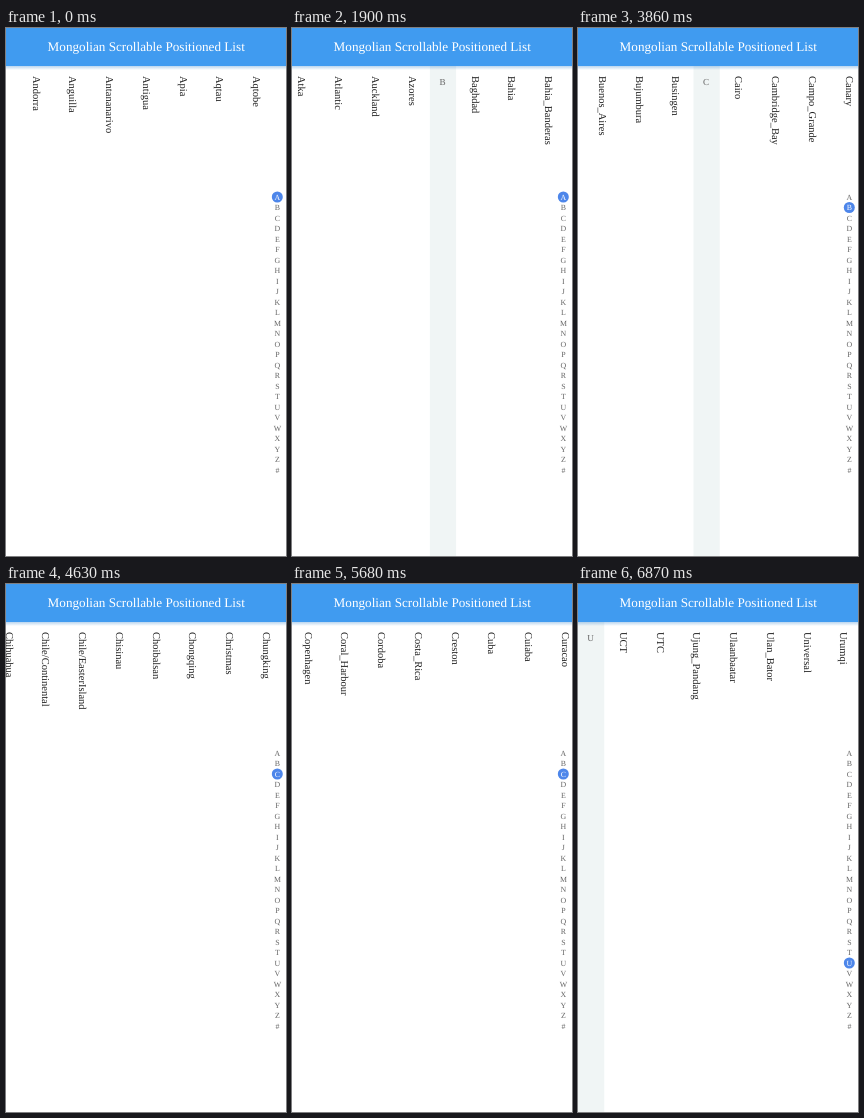
An HTML page with a canvas that plays this animation: 280x528 px, repeating every 8 s.

```html
<!DOCTYPE html>
<html lang="en">
<head>
<meta charset="utf-8">
<title>Mongolian Scrollable Positioned List</title>
<style>
html, body { margin: 0; width: 100%; height: 100%; overflow: hidden; background: #fff; }
canvas { display: block; width: 280px; height: 528px; }
</style>
</head>
<body>
<canvas id="stage"></canvas>
<script>
const W = 280, H = 528, LOOP = 8000, STEP = 70;
const ITEM = 36.75, HEADER = 26.25, START = 11.1, BAR = 38;
const SERIF = '"Liberation Serif", "Times New Roman", serif';
const LETTERS = 'ABCDEFGHIJKLMNOPQRSTUVWXYZ#';

const sections = `
Andorra Anguilla Antananarivo Antigua Apia Aqtau Aqtobe Araguaina Arizona Aruba Ashgabat Ashkhabad Asmara Asmera Asuncion Athens Atikokan Atka Atlantic Auckland Azores
Baghdad Bahia Bahia_Banderas Bahrain Baku Bamako Bangkok Bangui Banjul Barbados Beirut Belem Belfast Belgrade Belize Berlin Bermuda Beulah Bishkek Blanc-Sablon Blantyre Boa_Vista Bogota Boise Bratislava Brazzaville Brisbane Broken_Hill Brunei Brussels Bucharest Budapest Buenos_Aires Bujumbura Busingen
Cairo Cambridge_Bay Campo_Grande Canary Canberra Cancun Cape_Verde Caracas Casablanca Casey Catamarca Cayenne Cayman Central Ceuta Chagos Chatham Chicago Chihuahua Chile/Continental Chile/EasterIsland Chisinau Choibalsan Chongqing Christmas Chungking Cocos Colombo Comoro Conakry Copenhagen Coral_Harbour Cordoba Costa_Rica Creston Cuba Cuiaba Curacao Currie
Dacca Dakar Damascus Danmarkshavn Dar_es_Salaam Darwin Davis
EET EST EST5EDT East-Indiana Easter Eastern Edmonton
Fakaofo Faroe Fiji Fortaleza Freetown Funafuti
GB GB-Eire GMT Gaborone Galapagos Gambier Gaza
HST Halifax Harare Harbin Havana Hawaii Hebron
Indianapolis Inuvik Iqaluit Iran Irkutsk Isle_of_Man Israel
Jakarta Jamaica Japan Jayapura Jersey Jerusalem
Kabul Kaliningrad Kamchatka Kampala Karachi Kashgar Kathmandu
La_Paz Lagos Libreville Lima Lindeman Lisbon Ljubljana
MET MST MST7MDT Macao Macau Maceio Macquarie
NZ NZ-CHAT Nairobi Nassau Nauru Navajo Ndjamena
Ojinaga Omsk Oral Oslo Ouagadougou
PRC PST8PDT Pacific Pago_Pago Palau Palmer Panama
Qatar Qyzylorda
ROC ROK Rainy_River Rangoon Rankin_Inlet Recife Regina
Saigon Saipan Sakhalin Samara Samarkand Samoa San_Juan
Tahiti Taipei Tallinn Tarawa Tashkent Tbilisi Tehran
UCT UTC Ujung_Pandang Ulaanbaatar Ulan_Bator Universal Urumqi
Vaduz Vancouver Vatican Vevay Vienna Vientiane Vilnius`
  .trim().split('\n').map(line => line.split(' '));

// Lay the whole list out from left to right.
const rows = [], sectionLeft = [];
let edge = START;
sections.forEach((names, i) => {
  sectionLeft.push(i ? edge : 0);
  if (i) {
    rows.push({ x: edge, width: HEADER, letter: LETTERS[i] });
    edge += HEADER;
  }
  for (const name of names) {
    rows.push({ x: edge, width: ITEM, name });
    edge += ITEM;
  }
});

// Swipes: start time, number of steps, resting offset, deceleration.
const swipes = [
  [500, 9, 228.8, 1.5],
  [1340, 9, 645, 1.5],
  [2110, 9, 1040, 1.5],
  [2880, 8, 1489, 1.5],
  [3510, 8, 2050, 1.5],
  [4210, 12, 2956.4, 2],
  [5050, 12, 3234.9, 2]
];

// Letters touched while dragging along the index bar.
const DRAG_START = 5890, DRAG_PATH = 'CDEGIKMOQRSTUVU';

function offsetAt(t) {
  if (t >= DRAG_START) {
    const i = Math.min(DRAG_PATH.length - 1, Math.floor((t - DRAG_START) / STEP));
    return sectionLeft[LETTERS.indexOf(DRAG_PATH[i])];
  }
  let offset = 0;
  for (const [start, steps, end, power] of swipes) {
    if (t < start) break;
    const p = Math.min(1, (Math.floor((t - start) / STEP) + 1) / steps);
    offset += (end - offset) * (1 - (1 - p) ** power);
  }
  return offset;
}

const canvas = document.getElementById('stage');
const ctx = canvas.getContext('2d');
const ratio = window.devicePixelRatio || 1;
canvas.width = W * ratio;
canvas.height = H * ratio;
ctx.textRendering = 'geometricPrecision';

function text(str, x, y, size, color, align = 'center') {
  ctx.font = `${size}px ${SERIF}`;
  ctx.fillStyle = color;
  ctx.textAlign = align;
  ctx.fillText(str, x, y);
}

function drawRow(row, x) {
  const middle = x + row.width / 2;
  if (row.letter) {
    ctx.fillStyle = '#f0f5f5';
    ctx.fillRect(x, BAR, row.width, H - BAR);
    text(row.letter, middle - 0.5, 56.8, 9.19, '#666');
    return;
  }
  ctx.save();
  ctx.translate(middle - 2.8, 48);
  ctx.rotate(Math.PI / 2);
  text(row.name, 0, 0, 10.5, '#212121', 'left');
  ctx.restore();
}

function drawBar() {
  const shadow = ctx.createLinearGradient(0, BAR, 0, BAR + 4);
  shadow.addColorStop(0, 'rgba(64,140,210,0.36)');
  shadow.addColorStop(1, 'rgba(64,140,210,0)');
  ctx.fillStyle = shadow;
  ctx.fillRect(0, BAR, W, 4);
  ctx.fillStyle = '#409bf0';
  ctx.fillRect(0, 0, W, BAR);
  text('Mongolian Scrollable Positioned List', 140.2, 23.2, 13.18, '#fff');
}

function drawIndex(active) {
  [...LETTERS].forEach((letter, i) => {
    const y = 169 + i * 10.5;
    if (i === active) {
      ctx.fillStyle = '#4d86ea';
      ctx.beginPath();
      ctx.arc(271.3, y, 5.5, 0, Math.PI * 2);
      ctx.fill();
    }
    text(letter, 271.4, y + 2.7, 7.875, i === active ? '#fff' : '#666');
  });
}

function draw(t) {
  const offset = offsetAt(t);
  ctx.setTransform(ratio, 0, 0, ratio, 0, 0);
  ctx.fillStyle = '#fff';
  ctx.fillRect(0, 0, W, H);
  for (const row of rows) {
    const x = row.x - offset;
    if (x + row.width > 0 && x < W) drawRow(row, x);
  }
  drawBar();
  drawIndex(sectionLeft.filter(left => left <= offset).length - 1);
}

const origin = performance.now();
function tick() {
  draw((performance.now() - origin) % LOOP);
  requestAnimationFrame(tick);
}
tick();
</script>
</body>
</html>
```
